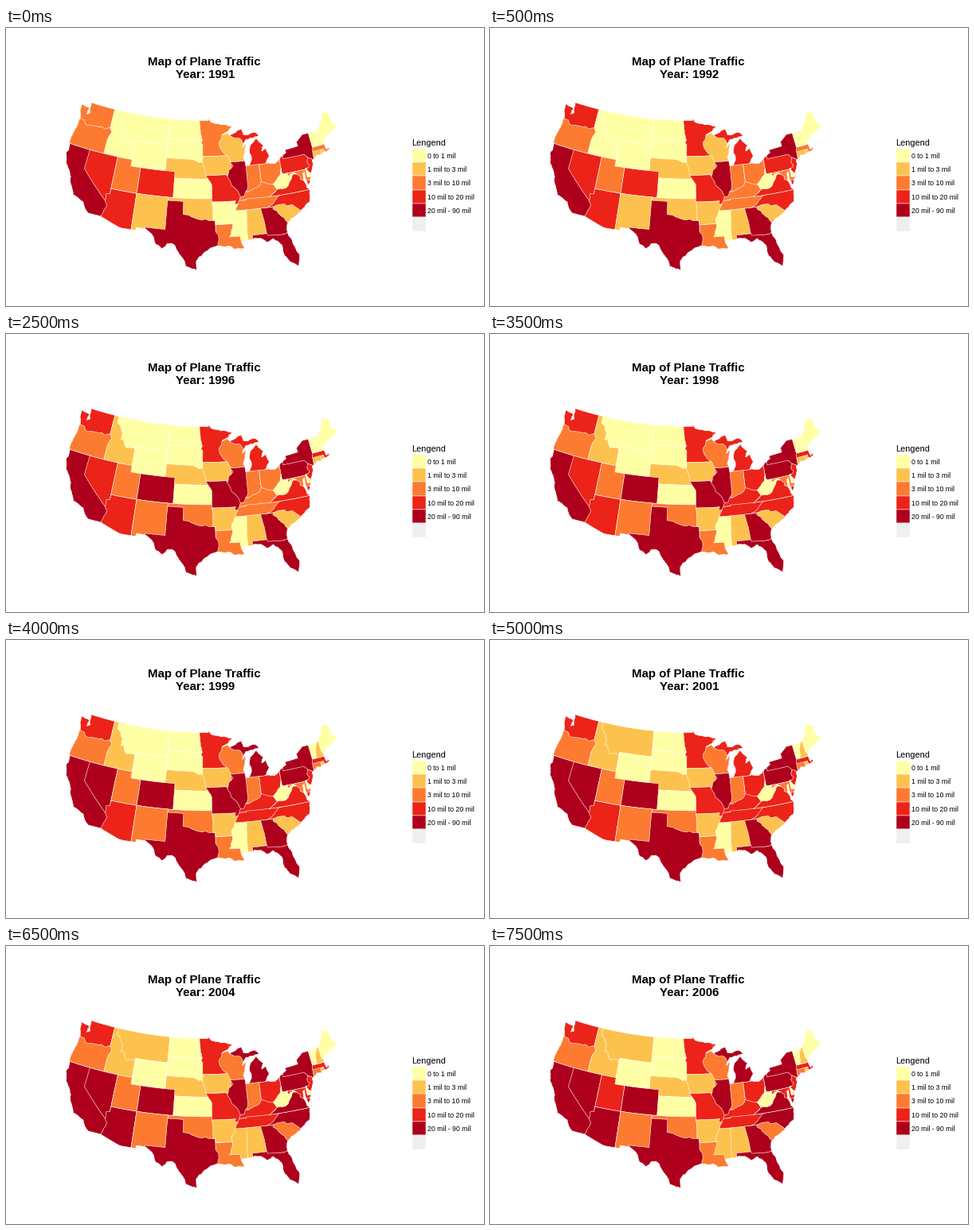
Recreate the animation shown at these times as a matplotlib script. Size 600 by 350 pixels, loop 8 s.

```python
import numpy as np
import matplotlib.pyplot as plt
from matplotlib.animation import FuncAnimation
from matplotlib.patches import Polygon, Rectangle

W, H, DPI = 600, 350, 100
START, YEARS, STEP_MS = 1991, 16, 500
COLORS = ["#FFFFA5", "#FDC24E", "#FC7B31", "#EC2319", "#AE001C"]
LABELS = ["0 to 1 mil", "1 mil to 3 mil", "3 mil to 10 mil",
          "10 mil to 20 mil", "20 mil - 90 mil"]

rng = np.random.default_rng(4)
fig = plt.figure(figsize=(W / DPI, H / DPI), dpi=DPI, facecolor="white")
ax = fig.add_axes([0, 0, 1, 1])
ax.set(xlim=(0, W), ylim=(H, 0))
ax.axis("off")

# Albers conic with standard parallels 39 and 45
S1, S2 = np.sin(np.radians([39, 45]))
N = (S1 + S2) / 2
C = 1 - S1 ** 2 + 2 * N * S1


def radius(lat):
    return np.sqrt(C - 2 * N * np.sin(np.radians(lat))) / N


def project(p):
    west, lat = p.T
    r, t = radius(lat), N * np.radians(95.84 - west)
    return np.column_stack([250.4 + 470 * r * np.sin(t),
                            116.5 + 470 * (r * np.cos(t) - radius(49))])


def line(*v):
    """Points in degrees west and north, in pairs."""
    return np.array(v, float).reshape(-1, 2)


def box(west, east, south, north):
    return line(west, north, east, north, east, south, west, south)


def rough(*v, amp=0.06):
    """A line through a few points, broken up like a river or a coast."""
    p = line(*v)
    for _ in range(3):
        d = np.diff(p, axis=0)
        mid = p[:-1] + d / 2 + d[:, ::-1] * [1, -1] * rng.normal(0, amp, (len(d), 1))
        p = np.insert(p, np.arange(1, len(p)), mid, axis=0)
    return p


def outline(*parts, **style):
    """Closed shape whose long edges follow the curved parallels."""
    p = np.concatenate(parts)
    out = []
    for a, b in zip(p, np.roll(p, -1, axis=0)):
        k = max(1, int(np.ceil(abs(b - a).max())))
        out.append(a + (b - a) * np.arange(k)[:, None] / k)
    return ax.add_patch(Polygon(project(np.concatenate(out)), joinstyle="round",
                                ec="white", lw=0.4, **style))


pacific = rough(122.76, 49, 122.3, 47.4, 122.9, 47.1, 122.7, 48.1, 124.7, 48.38, 124, 46.25,
                124.1, 44.7, 124.55, 42.84, 124.1, 41, 124.4, 40.4, 123.7, 38.9, 122.5, 37.8,
                121.9, 36.5, 120.6, 34.6, 118.5, 34, 117.12, 32.53)
desert = line(114.8, 32.5, 111.07, 31.33, 108.21, 31.33, 108.21, 31.78)
rio = rough(106.53, 31.78, 104.9, 30.6, 104.5, 29.6, 103.2, 28.98, 102.5, 29.8, 101.4, 29.77,
            100.3, 28.3, 99.5, 27.4, 99.1, 26.4, 97.3, 25.85)
gulf = rough(97.4, 27.2, 96.3, 28.4, 94.75, 29.4, 93.85, 29.7, 91.8, 29.6, 90.9, 29.05,
             89.1, 29, 89.6, 30.2, 88, 30.3, 86.2, 30.4, 85.3, 29.7, 84, 30.1, 82.7, 28.9,
             82.6, 27.5, 81.8, 26.1, 80.5, 25.2)
atlantic = rough(80.03, 26.8, 80.6, 28.4, 81.45, 30.7, 81.2, 32, 79.3, 33.1, 78, 33.87,
                 76.5, 34.65, 76.2, 35.3, 75.9, 36.6, 76.3, 37, 76.45, 39.2, 76.1, 39.4,
                 76.2, 38.4, 75.95, 37.2, 75.05, 38.45, 75.5, 39.5, 74.9, 38.95, 74, 40.4,
                 74, 40.75, 73.7, 40.95, 71.9, 41.32, 70.65, 41.55, 69.95, 41.7, 70.1, 42.05,
                 70.6, 41.85, 70.8, 42.7, 70.6, 43.1, 69.1, 44, 66.97, 44.8)
north = line(67.8, 45.7, 67.79, 47.07, 69.2, 47.46, 70.3, 45.9, 71.08, 45.3, 71.5, 45.01,
             74.7, 45, 76.3, 44.1, 76.2, 43.45, 79.05, 43.27)
lakes = rough(78.9, 42.85, 81.7, 41.5, 83.45, 41.73, 82.5, 42.8, 82.9, 44.05, 83.9, 43.7,
              83.35, 44.6, 84.75, 45.78, 86.25, 44.7, 86.5, 43.65, 86.2, 42.9, 86.9, 41.75,
              87.53, 41.7, 87.9, 43, 87.1, 45.2, 87.9, 44.6, 87.65, 45.1, 87, 45.75,
              84.7, 46, 83.95, 46.05, 84.9, 46.7, 87.4, 46.5, 87.8, 47.45, 90.4, 46.55,
              90.9, 46.95, 92.1, 46.75, 89.6, 48, 92, 48.3, 94.6, 48.75)
angle = line(95.15, 49.38, 95.15, 49)
land = outline(pacific, desert, rio, gulf, atlantic, north, lakes, angle, fc="none", zorder=5)

states = []


def state(level, steps, *parts):
    """Add an area with its first level and the years when the level changes.

    Areas may run out over the sea or under a later neighbour.
    """
    shape = outline(*parts)
    shape.set_clip_path(land)
    states.append((shape, level, steps))


# West
state(2, {1992: 3}, box(125.5, 117.03, 45, 49.5))
state(0, {1995: 1}, box(117.03, 111.05, 42, 49.5))
state(2, {}, rough(125, 46.2, 123, 46.1, 122.6, 45.6, 121.2, 45.65, 119, 45.95, 116.92, 46,
                   116.5, 45.5, 117.03, 44.2), line(117.03, 42, 125.5, 42))
state(0, {2000: 1}, line(104.05, 45, 104.05, 49.5, 116.05, 49.5),
      rough(116.05, 48, 114.4, 46.65, 114.5, 45.6, 113.95, 45.7, 113, 44.5, 111.4, 44.7,
            111.05, 44.48), line(111.05, 45))
state(4, {}, box(125.5, 114, 32, 42))
state(3, {1999: 4, 2002: 3, 2004: 4},
      line(120, 42, 120, 39, 114.63, 35, 114.05, 35, 114.05, 42))
state(2, {2005: 3}, box(114.05, 109.05, 37, 42))
state(3, {2004: 4}, line(109.05, 31, 109.05, 37, 114.05, 37, 114.05, 36.2),
      rough(114.7, 36.1, 114.6, 35, 114.15, 34.3, 114.72, 32.72), line(114.85, 32))

# Plains, with the southern rivers
state(0, {}, box(104.05, 96, 45.94, 49.5))
state(0, {}, box(104.05, 96, 42.5, 45.94))
state(1, {}, line(95.3, 40, 104.05, 40, 104.05, 43, 98.5, 43), rough(97.9, 42.8, 96.45, 42.5),
      line(95.3, 42))
state(0, {}, box(111.05, 104.05, 41, 45))
state(0, {}, box(102.05, 94.62, 37, 40))
state(1, {1993: 2, 2002: 1, 2004: 2}, box(103, 94.4, 33.5, 37))
state(3, {1996: 4, 2002: 3, 2004: 4}, box(109.05, 102.05, 37, 41))
state(1, {1995: 2, 2002: 1, 2004: 2}, box(109.05, 103, 31, 37))
state(2, {}, box(94.04, 88.7, 28.5, 33))
state(4, {}, line(106.62, 32, 103.05, 32, 103.05, 36.5, 100, 36.5),
      rough(100, 34.56, 98.2, 34.1, 97.2, 33.85, 95.8, 33.85, 94.04, 33.55),
      rough(94.04, 32, 93.55, 31.2, 93.75, 29.5), line(97, 25, 107, 29))
state(0, {1992: 1}, line(94.62, 36.5, 89.5, 36.5, 89.5, 33, 94.04, 33, 94.04, 33.55,
                         94.48, 33.64, 94.43, 35.4))
state(2, {1992: 3}, rough(97.23, 49, 96.8, 46.7, 96.56, 45.94, 96.85, 45.6, 96.45, 45.3),
      line(96.45, 43.5, 90, 43.5, 89, 48.5, 95, 49.7))
state(1, {1993: 0, 1995: 1}, rough(96.45, 43.5, 96.45, 42.5, 95.85, 41, 95.77, 40.58),
      line(91.7, 40.6, 91.42, 40.38, 90, 40.38, 90, 43.5))
state(3, {1996: 4, 2001: 3}, line(91.7, 40.6, 91.42, 40.38, 89, 38, 89, 36, 90.37, 36, 90.1, 36.5,
                                  94.62, 36.5), rough(94.61, 39.1, 95.3, 40, 95.77, 40.58))

# Lakes and Ohio valley
state(3, {1999: 4, 2001: 3, 2004: 4}, box(90.5, 82, 41.7, 47.7))
state(1, {1993: 2}, rough(92.1, 46.8, 92.3, 46.1, 92.85, 45.6, 92.7, 44.75, 91.2, 43.5, 90.65, 42.5),
      line(86.8, 42.5, 86.8, 45.4), rough(87.65, 45.1, 88.1, 45.9, 90.4, 46.55), line(90.9, 47.2))
state(4, {}, rough(90.65, 42.5, 90.15, 41.9, 91.1, 41.2, 91.42, 40.38, 90.7, 38.9, 90.2, 38.6,
                   89.13, 36.98), line(87.2, 37, 87.2, 42.5))
state(2, {}, line(87.53, 41.76, 87.53, 39.35), rough(87.5, 38.6, 88.05, 37.8),
      line(84.81, 37.8, 84.81, 41.76))
state(2, {1998: 3, 2002: 2, 2004: 3},
      line(84.81, 41.71, 83.3, 41.73, 80.52, 42.3, 80.52, 38, 84.81, 38))
state(2, {1997: 3}, rough(89.2, 37, 88.5, 37.1, 88.05, 37.8, 86.8, 38, 85.75, 38.27, 84.85, 39.1,
                          83.7, 38.65, 82.6, 38.4, 81.97, 37.54), line(83.68, 36.5, 89.4, 36.5))

# South
state(0, {2004: 1}, rough(90.3, 35, 91.1, 33.6, 91, 32.4, 91.6, 31),
      line(89.73, 31, 89.6, 30, 88, 30, 88, 35))
state(1, {}, line(88.2, 35, 88.45, 31.9, 88.4, 30, 84.9, 30, 84.9, 35))
state(4, {}, line(85.6, 35, 85.18, 32.87, 85, 30.5, 81, 30.5, 80.5, 32, 83.1, 35))
state(4, {}, line(87.6, 31, 85, 31, 84.87, 30.7, 82.1, 30.5, 81, 30.75, 79, 27, 80, 24,
                  84, 28, 87.5, 30))
state(2, {1998: 3, 2002: 2, 2004: 3}, rough(90.3, 35, 89.7, 36, 89.4, 36.5),
      line(88.07, 36.5, 88.07, 36.68, 81.68, 36.59, 82, 35))
state(3, {2004: 4}, rough(81.68, 36.59, 82.6, 36, 84.32, 35),
      line(83.1, 35, 78, 33, 75, 34.5, 75, 36.55))
state(1, {2004: 2}, rough(83.1, 35, 83.35, 34.7, 81.5, 33, 80.9, 31.9),
      line(78, 33.3, 78.55, 33.86, 79.67, 34.8, 80.8, 34.82, 81.04, 35.15, 82.3, 35.2))

# Northeast
state(3, {1996: 4}, box(80.52, 74.6, 39.72, 42.4))
state(2, {2004: 3}, box(79.48, 75, 37.5, 39.72))
state(3, {2004: 4}, line(83.68, 36.6, 75.3, 36.55, 75.3, 38),
      rough(76.3, 37.95, 77.2, 38.4, 77.05, 38.8, 77.72, 39.32, 78.35, 39.4),
      rough(81.97, 37.54, 82.9, 36.95))
state(0, {}, rough(82.6, 38.4, 81.97, 37.54, 80.3, 37.5, 78.35, 39.4, 77.72, 39.32, 78.3, 39.65,
                   79.48, 39.2),
      line(79.48, 39.72, 80.52, 39.72), rough(80.52, 40.64, 80.85, 39.7, 81.8, 38.95))
state(0, {}, box(75.75, 75, 38.46, 39.83))
state(3, {}, rough(74.7, 41.36, 75.15, 40.8, 74.75, 40.2, 75.5, 39.75),
      line(75.5, 39.3, 74.9, 38.7, 73.8, 39.5, 73.9, 41))
state(2, {1993: 3}, box(73.5, 69.5, 41, 42.73))
state(1, {1999: 2}, box(73.6, 71.8, 40.8, 42.04))
state(1, {}, box(71.8, 71.15, 41, 42.02))
state(4, {}, line(79.76, 42, 75.35, 42, 74.7, 41.36, 73.95, 41, 74.05, 40.5, 73.6, 40.9,
                  73.5, 42.05, 73.27, 42.74, 73.35, 45.2, 76.8, 44.8, 79.76, 43.5))
state(0, {}, line(73.35, 45.2, 71.3, 45.2, 71.5, 42.73, 73.27, 42.74))
state(0, {1999: 1}, line(71.08, 45.4, 71.5, 45.01), rough(72.1, 44.1, 72.46, 42.73),
      line(71.3, 42.7, 70.5, 42.9, 70.7, 43.07, 70.97, 43.4))
state(0, {}, line(71.08, 45.4, 70.97, 43.4, 70.5, 42.9, 66, 44.5, 67, 48, 70, 48))


def text(x, y, s, px, **kw):
    return ax.text(x, y, s, fontsize=px * 72 / DPI, family="Liberation Sans",
                   color="black", va="baseline", **kw)


text(248.6, 47, "Map of Plane Traffic", 15, weight="bold", ha="center")
year_text = text(250.3, 63, "", 15, weight="bold", ha="center")

text(509.5, 148, "Lengend", 11)
KEY = 17.28
for i, color in enumerate(COLORS + ["#EFEFEF"]):
    top = 151.9 + i * KEY
    ax.add_patch(Rectangle((510, top), KEY, KEY, fc=color, ec="white", lw=0.35))
    if i < len(LABELS):
        text(529.4, top + KEY / 2 + 3.2, LABELS[i], 8.8)


def draw(i):
    year = START + i
    year_text.set_text(f"Year: {year}")
    for shape, level, steps in states:
        for since, new in steps.items():
            if year >= since:
                level = new
        shape.set_facecolor(COLORS[level])
    return [year_text] + [s[0] for s in states]


anim = FuncAnimation(fig, draw, frames=YEARS, init_func=lambda: draw(0),
                     interval=STEP_MS, repeat=True)
plt.show()
```
